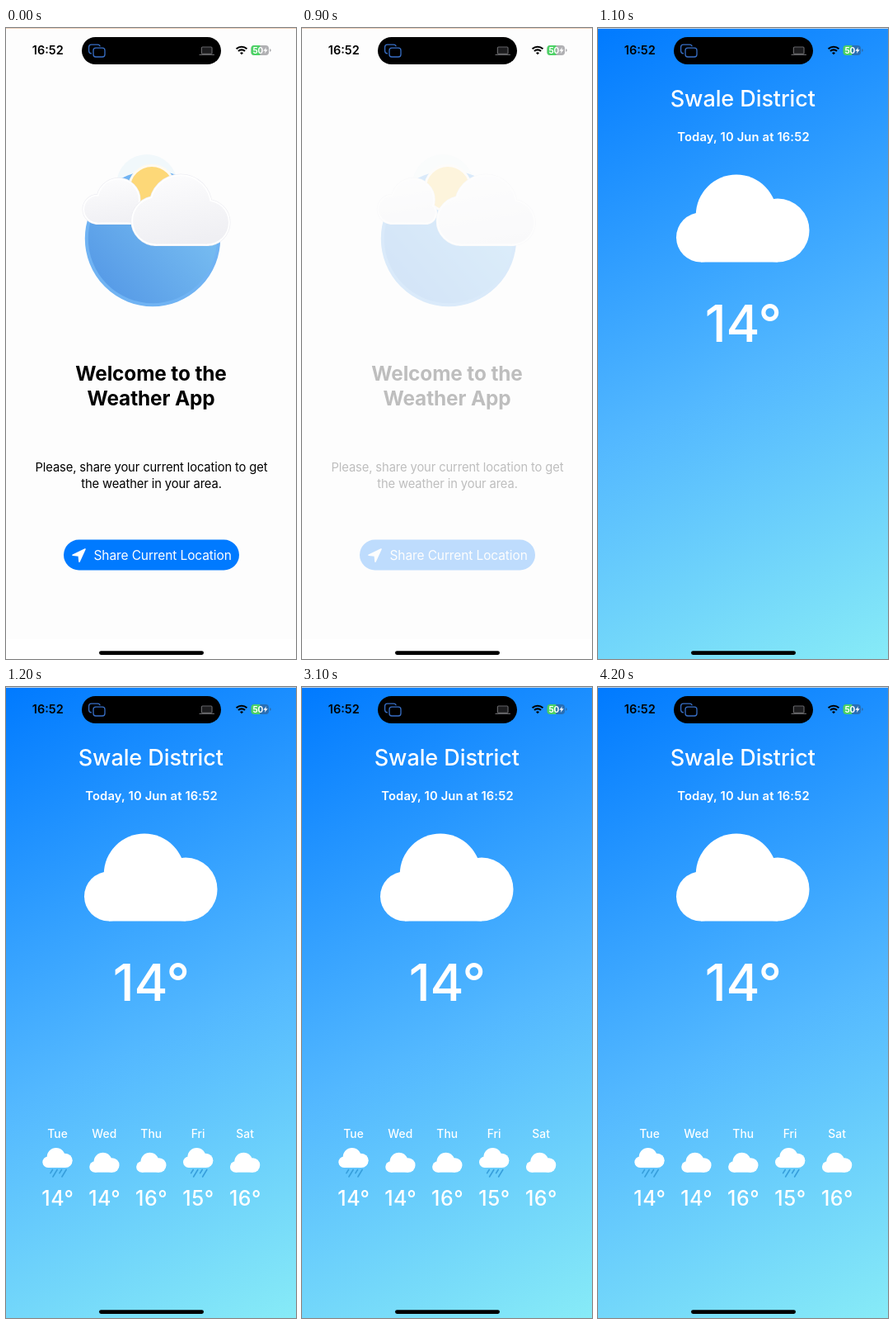
Animation, 352 px wide and 764 px high, one loop 5700 ms. Source, as an HTML page:

```html
<!DOCTYPE html>
<html lang="en">
<head>
<meta charset="utf-8">
<title>Weather App</title>
<style>
  html, body { margin: 0; height: 100%; overflow: hidden; background: #fdfdfd; }
  svg { display: block; width: 352px; height: 764px; }
  text { font-family: Inter, "Open Sans", sans-serif; }
  .mid { text-anchor: middle; }
  .title { font-size: 24.4px; font-weight: 700; letter-spacing: -.13px; }
  .body { font-size: 14.75px; letter-spacing: -.12px; }
  .city { font-size: 27px; font-weight: 500; letter-spacing: -.08px; }
  .date { font-size: 14.75px; font-weight: 600; letter-spacing: .15px; }
  .now { font-size: 62.5px; font-weight: 500; letter-spacing: -.3px; }
  .day { font-size: 13.8px; font-weight: 500; letter-spacing: .1px; }
  .temp { font-size: 25px; font-weight: 500; letter-spacing: .5px; }
  .rim { stroke: #eeeef3; stroke-width: 5; fill: #fff; }
  .edge { stroke: #fff; stroke-width: 3.6; fill: #fff; }
</style>
</head>
<body>
<svg viewBox="0 0 352 764">
  <defs>
    <linearGradient id="sky" gradientUnits="userSpaceOnUse" x1="0" y1="0" x2="352" y2="764">
      <stop stop-color="#007aff"/><stop offset=".55" stop-color="#53b8ff"/><stop offset="1" stop-color="#87ebf7"/>
    </linearGradient>
    <linearGradient id="globe" x1=".1" y1=".9" x2=".9" y2=".2">
      <stop stop-color="#5599e6"/><stop offset="1" stop-color="#7cc2f3"/>
    </linearGradient>
    <linearGradient id="puff" gradientUnits="userSpaceOnUse" x1="180" y1="180" x2="195" y2="264">
      <stop stop-color="#fcfcfd"/><stop offset="1" stop-color="#efeff3"/>
    </linearGradient>
    <linearGradient id="puffBack" gradientUnits="userSpaceOnUse" x1="120" y1="183" x2="128" y2="237">
      <stop stop-color="#fcfcfd"/><stop offset="1" stop-color="#f0f0f4"/>
    </linearGradient>
    <g id="cloud">
      <circle cx="125" cy="253.5" r="30"/><circle cx="168" cy="226.7" r="49.2"/>
      <circle cx="218" cy="245" r="38.5"/><rect x="125" y="230" width="93" height="53.5"/>
    </g>
    <g id="front">
      <circle cx="182" cy="233.5" r="28"/><circle cx="212" cy="215" r="36"/>
      <circle cx="244" cy="235.5" r="26"/><rect x="182" y="225" width="62" height="36.5"/>
    </g>
    <g id="back">
      <circle cx="111" cy="219.5" r="16"/><circle cx="136.5" cy="208" r="24.5"/>
      <circle cx="152" cy="224" r="11.5"/><rect x="111" y="212" width="41" height="23.5"/>
    </g>
  </defs>

  <rect width="352" height="764" fill="#fdfdfd"/>
  <rect y="740" width="352" height="24" fill="#fff"/>

  <g id="welcome">
    <circle cx="171" cy="190" r="37" fill="#f1f8fb"/>
    <circle cx="178" cy="255" r="80.2" fill="url(#globe)" stroke="#70b3f3" stroke-width="4"/>
    <circle cx="177" cy="194" r="27.5" fill="#fdd878" stroke="#fffaf0" stroke-width="3"/>
    <g id="backCloud">
      <use href="#back" class="rim"/><use href="#back" class="edge"/><use href="#back" fill="url(#puffBack)"/>
    </g>
    <g id="frontCloud">
      <use href="#front" class="rim"/><use href="#front" class="edge"/><use href="#front" fill="url(#puff)"/>
    </g>
    <text class="mid title" x="176" y="426.7">Welcome to the</text>
    <text class="mid title" x="176" y="457">Weather App</text>
    <text class="mid body" x="176.5" y="537">Please, share your current location to get</text>
    <text class="mid body" x="176.5" y="556.5">the weather in your area.</text>
    <rect x="70" y="619.5" width="213" height="37" rx="18.5" fill="#007aff"/>
    <path d="M96 631L81 638.2L88.3 639L89 646.2Z" fill="#fff" stroke="#fff" stroke-width="1.6" stroke-linejoin="round"/>
    <text x="106.5" y="643.5" fill="#fff" font-size="15.5" letter-spacing="-.11">Share Current Location</text>
  </g>

  <g id="weather" fill="#fff">
    <rect width="352" height="764" fill="url(#sky)"/>
    <text class="mid city" x="175.8" y="95">Swale District</text>
    <text class="mid date" x="176.5" y="137">Today, 10 Jun at 16:52</text>
    <use href="#cloud"/>
    <text class="mid now" x="176.3" y="380">14°</text>
    <g id="forecast"></g>
  </g>

  <rect id="topLine" width="352" height="1"/>
  <text x="31.8" y="32" font-size="14.5" font-weight="600">16:52</text>
  <rect x="92" y="11" width="169" height="33" rx="16.5"/>
  <g fill="#000" stroke="#386fc6" stroke-width="1.3">
    <rect x="100.6" y="20.2" width="13.6" height="10.6" rx="3"/>
    <rect x="106" y="24.2" width="14" height="10.8" rx="3" stroke="#000" stroke-width="4"/>
    <rect x="106" y="24.2" width="14" height="10.8" rx="3"/>
  </g>
  <g stroke="#636366" stroke-width="1.2" fill="#1c1c1e">
    <rect x="237.4" y="23" width="12.6" height="8.4" rx="1.2"/>
    <path d="M235 32.3H252.5" stroke-linecap="round"/>
  </g>
  <g fill="none" stroke="#000" stroke-width="2.1">
    <path d="M279.6 25.3A9.2 9.2 0 0 1 292.4 25.3M282 28.1A5.6 5.6 0 0 1 290 28.1"/>
    <path d="M284 30.2A2.9 2.9 0 0 1 288 30.2L286 32.3Z" fill="#000" stroke="none"/>
  </g>
  <rect x="297.5" y="21" width="21.5" height="12" rx="3.8" fill="#3c3c43" fill-opacity=".4"/>
  <path d="M301.3 21H308.3V33H301.3A3.8 3.8 0 0 1 297.5 29.2V24.8A3.8 3.8 0 0 1 301.3 21Z" fill="#4cd265"/>
  <path d="M320 25.2A1.8 1.8 0 0 1 320 28.8Z" fill="#3c3c43" fill-opacity=".4"/>
  <text x="299.6" y="30.7" fill="#fff" font-size="10" font-weight="700" letter-spacing="-.2">50</text>
  <path d="M316 23.2L312.4 27.7H314.7L313.9 30.9L317.6 26.3H315.2Z" fill="#fff"/>
  <rect x="113" y="754.3" width="127" height="4.6" rx="2.3"/>
</svg>
<script>
const $ = id => document.getElementById(id);
const days = [["Tue", 14, 1], ["Wed", 14], ["Thu", 16], ["Fri", 15, 1], ["Sat", 16]];

$("forecast").innerHTML = days.map(([day, temp, rain], i) => {
  const y = rain ? 558 : 563.7;
  const drops = rain
    ? '<path d="M-6 584.5L-8.6 588.6M-.4 584.5L-5.6 593M5 584.5L2.4 588.6M10.6 584.5L5.4 593" stroke="#379fdc" stroke-width="1.6" stroke-linecap="round"/>'
    : "";
  return `<g transform="translate(${62.5 + i * 56.9} 0)">
    <text class="mid day" y="546">${day}</text>
    <use href="#cloud" transform="translate(0 ${y}) scale(.225) translate(-175.7 -177)"/>${drops}
    <text class="mid temp" x=".3" y="627.5">${temp}°</text></g>`;
}).join("");

const show = (id, on) => $(id).style.display = on ? "" : "none";
const slide = (id, x) => $(id).setAttribute("transform", `translate(${x} 0)`);
const fade = t => Math.min(1, Math.max(0, (1000 - t) / 400));

function draw(now) {
  const t = Math.floor(now % 5700 / 100) * 100;
  slide("frontCloud", t * .0125);
  slide("backCloud", t * -.002);
  $("welcome").style.opacity = fade(t);
  show("weather", t >= 1100);
  show("forecast", t >= 1200);
  $("topLine").setAttribute("fill", t < 1100 ? "#f0d2bd" : "#c5d2e0");
}

const start = performance.now();
function tick() {
  draw(performance.now() - start);
  requestAnimationFrame(tick);
}
tick();
</script>
</body>
</html>
```
